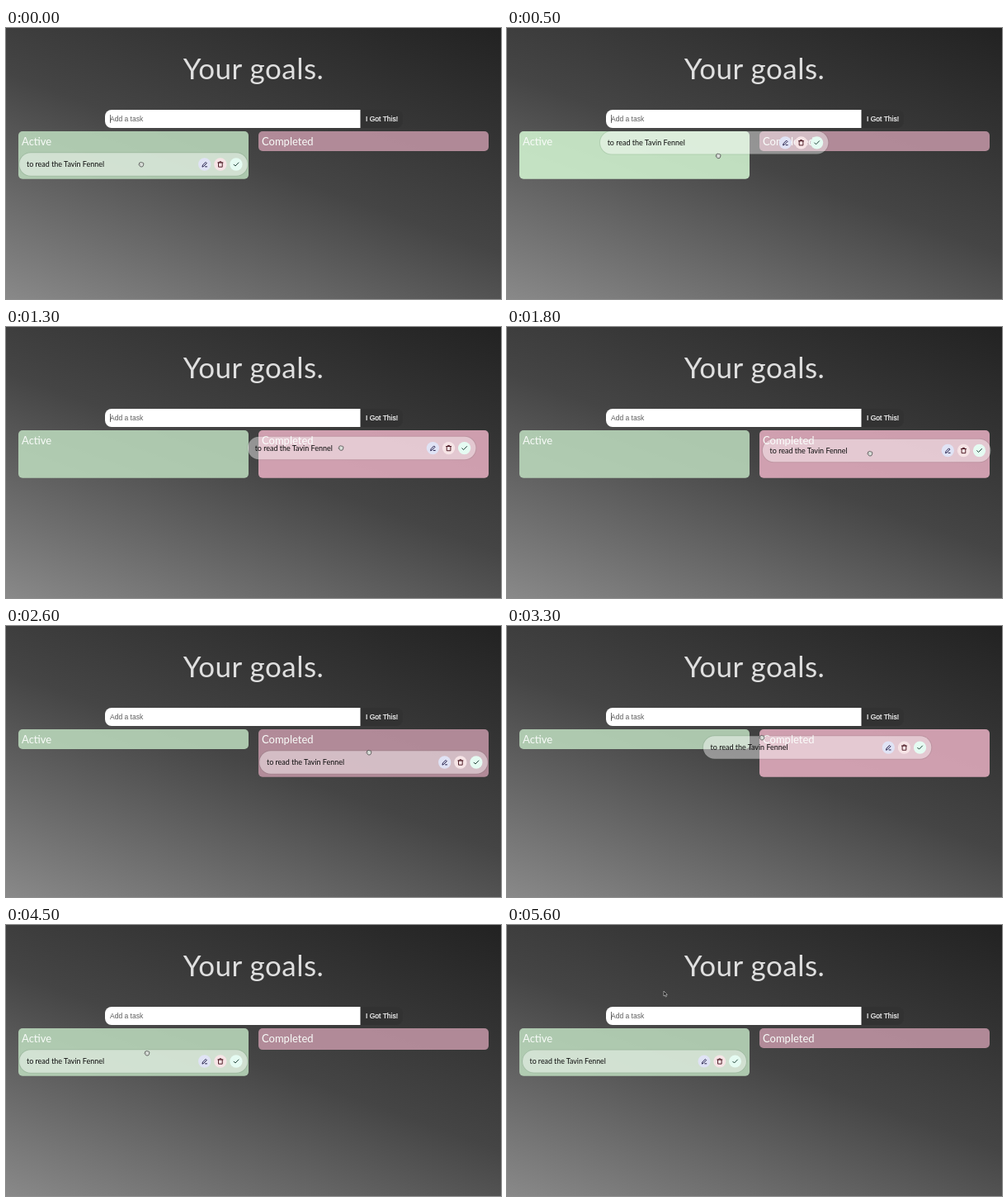
Write an HTML page that moves like this. It is 600 px wide and 328 px high and loops after 5.8 s.

```html
<!DOCTYPE html>
<html lang="en">
<head>
<meta charset="utf-8">
<title>Your goals</title>
<style>
  html, body { margin: 0; width: 100%; height: 100%; overflow: hidden; }
  svg {
    display: block; width: 100%; height: 100%;
    background: linear-gradient(20deg, #898989, #454545 50%, #222);
  }
  text { font-family: Lato, "Open Sans", sans-serif; fill: #fff; }
  .sans { font-family: "Liberation Sans", Arial, sans-serif; font-size: 8.5px; }
  .head { font-size: 13px; fill: #f8fbf8; }
  .icon { fill: none; stroke-width: .9; stroke-linecap: round; stroke-linejoin: round; }
</style>
</head>
<body>
<svg viewBox="0 0 600 328" preserveAspectRatio="none">
  <text x="300" y="62" font-size="35" text-anchor="middle" letter-spacing=".5" style="fill:#dfdfdf">Your goals.</text>

  <path d="M429 99h44a8 8 0 0 1 8 8v6a8 8 0 0 1-8 8h-44z" fill="#323232"/>
  <path d="M429.5 99h-301.5a8 8 0 0 0-8 8v6a8 8 0 0 0 8 8h301.5z" fill="#fff"/>
  <text class="sans" x="126" y="113" style="fill:#5c5c5c">Add a task</text>
  <text class="sans" x="436" y="113" stroke="#fff" stroke-width=".2">I Got This!</text>
  <rect id="caret" x="126" y="105" width=".6" height="10" fill="#111"/>

  <rect id="active" x="15" y="125" width="279" rx="5"/>
  <rect id="done" x="306" y="125" width="279" rx="5"/>
  <text class="head" x="19" y="142">Active</text>
  <text class="head" x="310" y="142">Completed</text>

  <g id="task">
    <rect x="-136" y="-14" width="272" height="28" rx="14" fill="none" stroke="#284632" stroke-opacity=".1"/>
    <rect x="-135.5" y="-13.5" width="271" height="27" rx="13.5" fill="#fff" fill-opacity=".43"/>
    <text x="-127" y="3" font-size="8.8" style="fill:#0c0c0c">to read the Tavin Fennel</text>
    <g transform="translate(84.5 0)">
      <circle r="7.5" fill="#e0e3f5"/>
      <path class="icon" stroke="#17123f" d="M-2.6 2.7L-2.2 1 1.3-2.6 2.6-1.3-.9 2.2zM.8 2.8H2.8"/>
    </g>
    <g transform="translate(103.3 0)">
      <circle r="7.5" fill="#f6e4e6"/>
      <path class="icon" stroke="#43101a" d="M-3-2H3M-1-2V-3.1H1V-2M-2.3-2V3.1H2.3V-2"/>
    </g>
    <g transform="translate(122 0)">
      <circle r="7.5" fill="#e5fbf2"/>
      <path class="icon" stroke="#0d3326" d="M-2.8.2L-1 2 2.9-2"/>
    </g>
  </g>

  <g id="cursor" stroke-linejoin="round">
    <path id="hand" fill="#d9ded9" stroke="#333" stroke-width=".7"
      d="M-2.4-.9Q-2.5-2.4-1.3-2.1Q-.5-3 .3-2.2Q1.2-2.7 1.7-1.8Q2.9-1.9 2.8-.5L2.4 1.5Q2 2.9 .8 2.9H-.6Q-1.5 2.8-2.1 1.6L-3 .5Q-3-.7-2.4-.4L-1.5.4"/>
    <path id="arrow" fill="#111" stroke="#ddd" stroke-width=".6" d="M0 0V6L1.4 4.8 2.4 7 3.4 6.5 2.5 4.4H4.3z"/>
  </g>
</svg>
<script>
const LOOP = 5800, STEP = 100;
const ROW_Y = 165;
const columns = {
  active: { x: 154.5, dim: "191,223,192", lit: "214,250,213" },
  done: { x: 445.5, dim: "198,152,169", lit: "233,177,196" }
};

// Times in ms; lift is how high the task hangs above its row
const drags = [
  { from: "active", to: "done", start: 200, cross: 600, land: 1600, drop: 1900, blink: 1100, lift: 15.5 },
  { from: "done", to: "active", start: 3100, cross: 3500, land: 4400, drop: 4400, blink: 3600, lift: 9 }
];

// Pointer waypoints: time, x, y
const waypoints = [
  [200, 164, 165], [900, 379, 141], [1800, 440, 153], [2600, 440, 153], [3100, 420, 160],
  [3300, 309, 135], [3900, 185, 150], [4500, 171, 155], [4900, 172, 153], [5300, 190, 80]
];

const $ = id => document.getElementById(id);
const ramp = (t, from, to) => Math.max(0, Math.min(1, (t - from) / (to - from)));
const mix = (a, b, k) => a + (b - a) * k;
const show = (id, on) => { $(id).style.display = on ? "" : "none"; };

function taskAt(t, d) {
  const k = ramp(t, d.start, d.land);
  const held = ramp(t, d.start, d.start + 200) * (1 - ramp(t, d.drop - 100, d.drop + 100));
  const arc = 81 * k * (1 - k) ** 2;
  const x = mix(columns[d.from].x, columns[d.to].x, Math.sin(k * Math.PI / 2));
  return [x + held * k * d.lift / 6, ROW_Y - held * (d.lift + arc)];
}

function pointerAt(t) {
  const next = waypoints.findIndex(p => p[0] > t);
  if (next < 1) return waypoints.at(next).slice(1);
  const a = waypoints[next - 1], b = waypoints[next], k = ramp(t, a[0], b[0]);
  return [mix(a[1], b[1], k), mix(a[2], b[2], k)];
}

function drawColumn(id, open, lit) {
  $(id).setAttribute("height", 24 + 33.7 * open);
  $(id).setAttribute("fill", `rgba(${columns[id][lit ? "lit" : "dim"]},.85)`);
}

function draw(t) {
  const d = drags.findLast(g => t >= g.start) || drags[0];
  const [x, y] = taskAt(t, d);
  const scale = mix(1.02, 1, ramp(t, 4900, 5200));
  $("task").setAttribute("transform", `translate(${x} ${y}) scale(${scale})`);

  const dragging = t > d.start && t < d.drop;
  drawColumn(d.from, (1 - ramp(t, d.drop, d.drop + 200)) ** 4, dragging && t < d.cross);
  drawColumn(d.to, ramp(t, d.cross - 100, d.cross + 100), dragging && t >= d.cross);

  $("cursor").setAttribute("transform", `translate(${pointerAt(t).join(" ")})`);
  show("hand", t < 5000);
  show("arrow", t >= 5000);

  // Blinking pauses while a drag begins
  show("caret", Math.floor(Math.max(0, t - d.blink) / 500) % 2 === 0);
}

const start = performance.now();
function tick() {
  const t = (performance.now() - start) % LOOP;
  draw(Math.floor(t / STEP) * STEP);
  requestAnimationFrame(tick);
}
tick();
</script>
</body>
</html>
```
